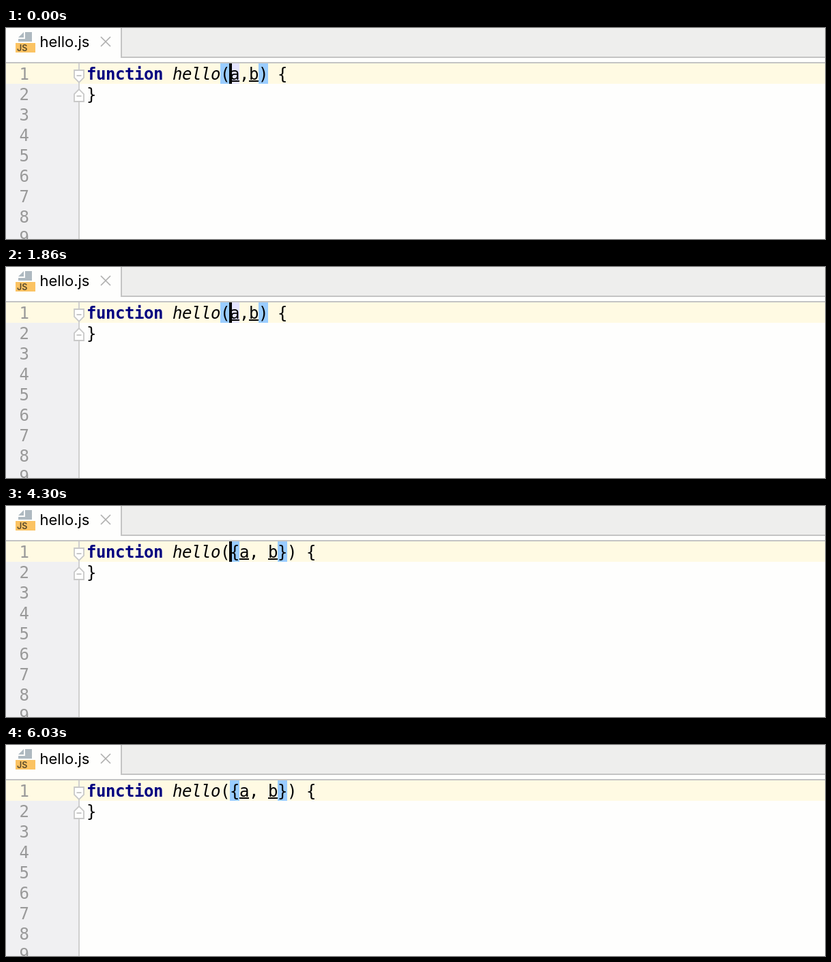
Recreate the animation shown at these times as an HTML page. Size 1200 px wide and 310 px high, loop 6360 ms.

```html
<!DOCTYPE html>
<html lang="en">
<head>
<meta charset="utf-8">
<title>hello.js</title>
<style>
  html, body { margin: 0; width: 100%; height: 100%; overflow: hidden; background: #fefefd; }
  svg { display: block; }
  text { white-space: pre; }
  .code { font: 24px "DejaVu Sans Mono", monospace; letter-spacing: -0.45px; }
  .ui { font-family: Inter, sans-serif; font-optical-sizing: none; }
  .key { font-weight: bold; fill: #000080; }
  .name { font-style: italic; }
  .popup { filter: drop-shadow(0 12px 13px rgba(0, 0, 0, .3)); }
</style>
</head>
<body>
<svg width="1200" height="310" viewBox="0 0 1200 310">
  <!-- tab bar -->
  <path fill="#eeeeed" d="M169 0H1200V43H169z"/>
  <path fill="none" stroke="#c4c4c4" stroke-width="2" d="M169 0V43H1200M0 51H1200"/>
  <path fill="#aeb9c0" d="M26 6V14H18zM28 6H38V20H18V16H28z"/>
  <path fill="#fbc363" d="M14 22H43V36H14z"/>
  <text class="ui" x="16" y="33.5" font-size="12.5" font-weight="600" fill="#594a2b">JS</text>
  <text class="ui" x="49.5" y="28" font-size="22">hello.js</text>
  <path stroke="#adadad" stroke-width="1.6" d="M139 13L153 27M153 13L139 27"/>

  <!-- editor -->
  <path fill="#f0f0f2" d="M0 52H107V310H0z"/>
  <path fill="#fffae3" d="M0 52H1200V82H0z"/>
  <path stroke="#d0d0d0" stroke-width="2" d="M107 52V310"/>
  <g fill="#fefefd" stroke="#c8c8c8" stroke-width="1.8">
    <path d="M100 62H114V73L107 80L100 73zM103.500 70H110.500"/>
    <path d="M100 108H114V97L107 90L100 97zM103.500 100H110.500"/>
  </g>
  <g id="numbers" class="code" fill="#999"></g>
  <text class="code" x="118" y="106">}</text>
  <g id="line"></g>
  <path id="caret" d="M327 52H331V82H327z"/>

  <g id="menu">
    <path class="popup" fill="#fff" d="M328 82H954V196H328z"/>
    <path fill="none" stroke="#000" stroke-opacity=".18" d="M327.500 81.500H954.500V196.500H327.500z"/>
    <path fill="#0049db" d="M328 82H954V120H328z"/>
    <g id="items"></g>
  </g>
</svg>
<script>
const LOOP = 6360, COL = 14, LEFT = 118;
const $ = id => document.getElementById(id);
const colX = col => LEFT + col * COL;

const band = (col, fill) =>
  `<rect x="${colX(col)}" y="52" width="${COL}" height="30" fill="${fill}"/>`;
const underline = (col, count = 1) =>
  `<rect x="${colX(col)}" y="77" width="${count * COL}" height="2"/>`;
const code = (col, text, style = "") =>
  `<text class="code ${style}" x="${colX(col)}" y="76">${text}</text>`;
const codeLine = (bands, params, lines) => bands +
  code(0, "function", "key") + code(9, "hello", "name") + code(14, params + " {") + lines;

const braces = band(15, "#99ccff") + band(20, "#99ccff");
const before = codeLine(
  band(14, "#99ccff") + band(15, "#e4e4ff") + band(18, "#99ccff"),
  "(a,b)", underline(15) + underline(17));
const converted = codeLine(braces, "({a, b})", underline(15, 6));
const settled = codeLine(braces, "({a, b})", underline(16) + underline(19));

$("numbers").innerHTML = Array.from({ length: 9 }, (_, i) =>
  `<text x="19.5" y="${76 + 30 * i}">${i + 1}</text>`).join("");

$("items").innerHTML = [
  "Convert parameters to object",
  "Convert to variable holding arrow function",
  "Inspection 'Unused local symbol' options"
].map((label, i) => `<g transform="translate(0 ${38 * i})">
  <path stroke="#6e6e6e" stroke-width="2" d="M350 94H367M350 99H362M350 104H357"/>
  <path fill="#6e6e6e" d="M355 110L356.500 105L365.500 96L369.500 100L360.500 109zM367 94.500L369 92.500L373 96.500L371 98.500z"/>
  <text class="ui" x="383.500" y="110" font-size="26" fill="${i ? "#1a1a1a" : "#fff"}">${label}</text>
  <path fill="${i ? "#999" : "#fff"}" d="M920 93L932 100.500L920 108z"/>
</g>`).join("");

// The caret flips at each of these times, starting visible.
const flips = [330, 860, 1360, 1860, 2360, 4030, 5030, 5530, 6030];
const show = (id, on) => $(id).setAttribute("visibility", on ? "visible" : "hidden");
let current;

function draw(now) {
  const t = now % LOOP;
  const next = t < 4030 ? before : t < 4300 ? converted : settled;
  if (next !== current) $("line").innerHTML = current = next;
  show("caret", flips.filter(f => f <= t).length % 2 === 0);
  show("menu", t >= 2360 && t < 4000);
  requestAnimationFrame(() => draw(performance.now()));
}
draw(0);
</script>
</body>
</html>
```
